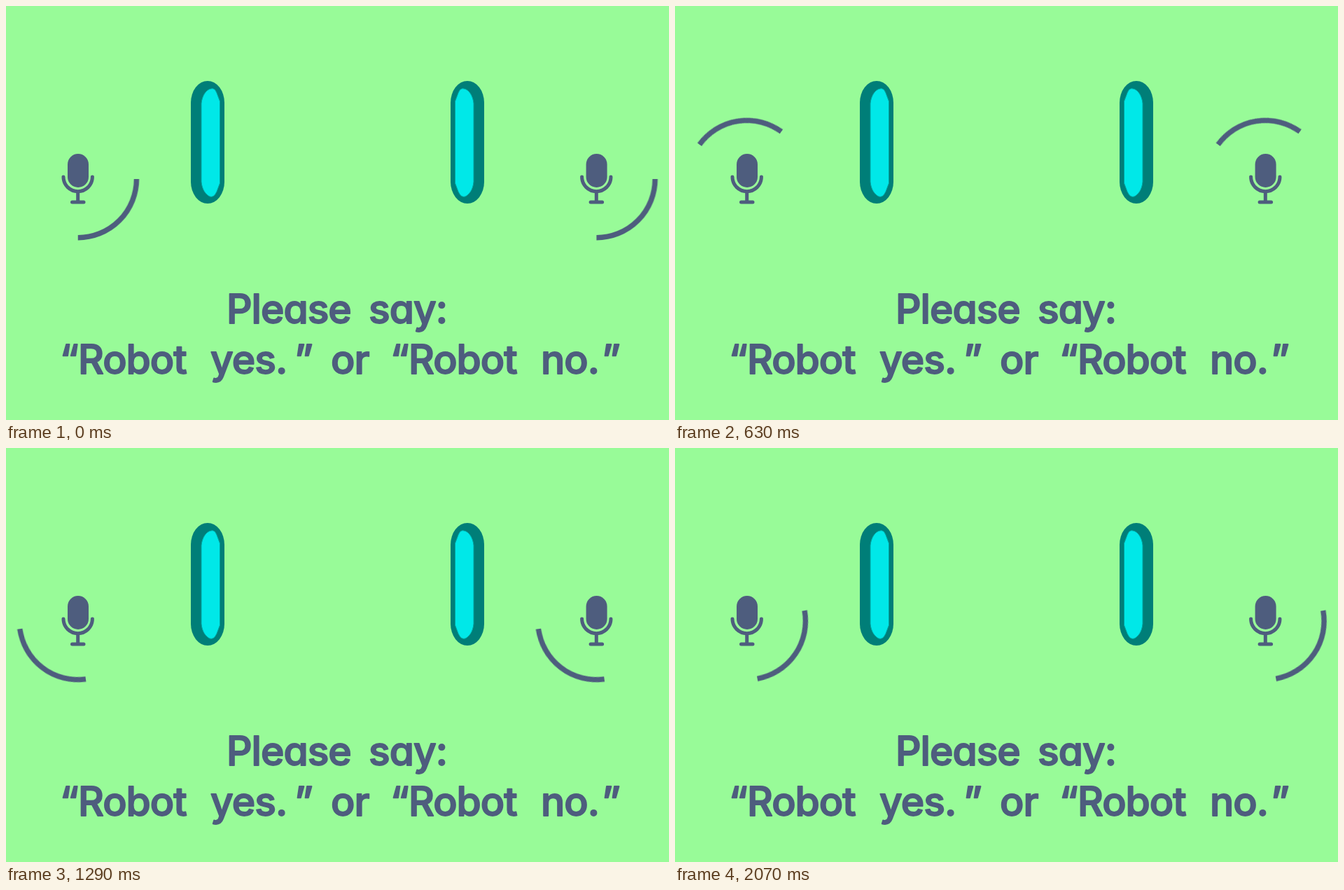
Recreate the animation shown at these times as an HTML page. Size 947 by 591 pixels, loop 2100 ms.

```html
<!DOCTYPE html>
<html lang="en">
<head>
<meta charset="utf-8">
<title>Robot prompt</title>
<style>
  html, body { margin: 0; width: 100%; height: 100%; overflow: hidden; background: #98fb98; }
  svg { display: block; width: 947px; height: 591px; }

  .mic { fill: none; stroke: #4e5d7e; stroke-width: 5; stroke-linecap: round; }
  .head { fill: #4e5d7e; stroke: none; }
  .arc {
    fill: none; stroke: #4e5d7e; stroke-width: 7.5;
    animation: spin 1050ms steps(35, end) infinite;
  }

  .eye { transform-origin: 288px 250px; animation: blink 2100ms linear infinite; }
  .open { animation: show 2100ms step-end infinite; }
  .lid {
    fill: none; stroke: #007c76; stroke-width: 6.6; stroke-linecap: round;
    visibility: hidden; animation: shut 2100ms step-end infinite;
  }
  .shell { fill: #007e78; }
  .glow { fill: #00e8e8; stroke: #00a3a0; stroke-width: 1; }

  /* the thin round-joined stroke softens the letter corners */
  text {
    font: 500 57px Inter, "Open Sans", sans-serif;
    font-feature-settings: "cv11";
    letter-spacing: -1px;
    fill: #4e5d7e; stroke: #4e5d7e; stroke-width: 1.8; stroke-linejoin: round;
  }

  @keyframes spin { to { transform: rotate(360deg); } }

  /* closes from 720 ms, shut 810 to 930 ms, springs open past full height */
  @keyframes blink {
    0%, 34.286% { transform: none; }
    38.571%, 44.286% { transform: scale(1.3, .06); }
    50% { transform: scale(1, 1); }
    51.429%, 52.857% { transform: scale(.96, 1.07); }
    55.714%, 100% { transform: none; }
  }
  @keyframes show {
    0%, 44.286% { visibility: visible; }
    38.571% { visibility: hidden; }
  }
  @keyframes shut {
    0%, 44.286% { visibility: hidden; }
    38.571% { visibility: visible; }
  }
</style>
</head>
<body>
<svg viewBox="0 0 947 591">
  <defs>
    <g id="mic" class="mic">
      <rect class="head" x="88" y="211" width="30" height="48" rx="15"/>
      <path d="M82 244A20.7 20.7 0 0 0 123.400 244M102.700 266V279M94.500 280H111"/>
    </g>
    <path id="arc" d="M83.700 0A83.700 83.700 0 0 1 0 83.700"/>
    <g id="eye">
      <rect class="shell" x="264" y="107" width="48" height="175" rx="24" ry="31"/>
      <path class="glow" d="M279 139C280 128 286 119 293 118Q298 116.500 301 124L305.500 136V253L301 265Q297 274 291 272C285 269 280 262 279 251Z"/>
    </g>
    <path id="lid" d="M260.500 249Q288 248.500 317 258"/>
  </defs>

  <use href="#mic"/>
  <use href="#mic" x="740.600"/>
  <g transform="translate(102.700 247)"><g class="arc"><use href="#arc"/></g></g>
  <g transform="translate(843.400 247)"><g class="arc"><use href="#arc"/></g></g>

  <g class="open">
    <g class="eye"><use href="#eye"/></g>
    <g transform="matrix(-1 0 0 1 947 0)"><g class="eye"><use href="#eye"/></g></g>
  </g>
  <g class="lid">
    <use href="#lid"/>
    <use href="#lid" transform="matrix(-1 0 0 1 950 0)"/>
  </g>

  <text y="453"><tspan x="315">Please </tspan><tspan x="518">say:</tspan></text>
  <text y="525"><tspan x="77">“Robot </tspan><tspan x="292">yes.</tspan><tspan x="412">” </tspan><tspan x="464">or </tspan><tspan x="549">“Robot </tspan><tspan x="764">no.</tspan><tspan x="851">”</tspan></text>
</svg>
</body>
</html>
```
